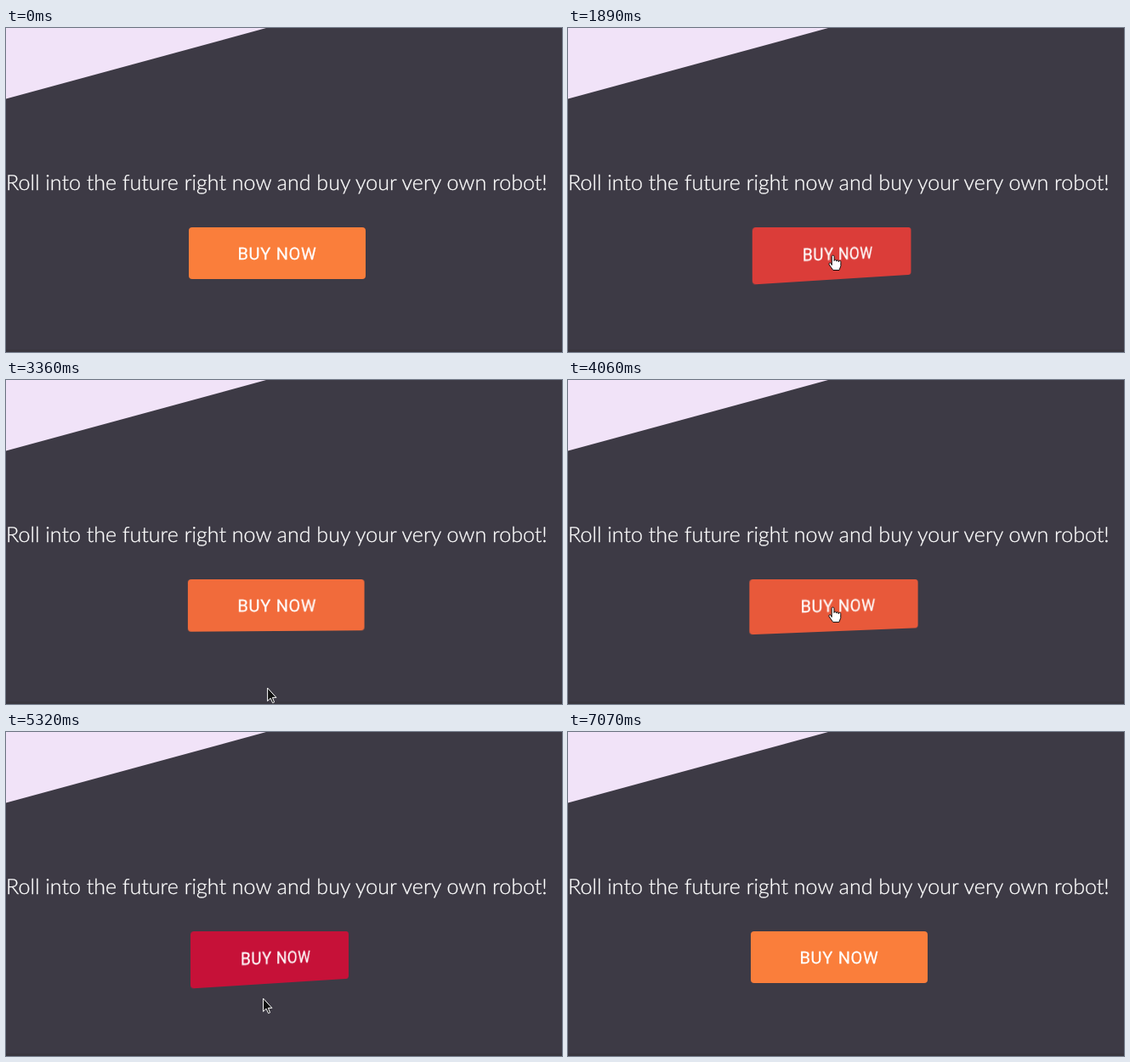
An HTML page that plays this animation: 654x382 px, repeating every 7490 ms.

```html
<!DOCTYPE html>
<html lang="en">
<head>
<meta charset="utf-8">
<title>Buy now</title>
<style>
html, body { margin: 0; width: 100%; height: 100%; overflow: hidden; background: #3d3a45; }
#stage { position: relative; width: 654px; height: 382px; overflow: hidden; }
svg { position: absolute; left: 0; top: 0; }
#line {
  font: 300 26px Lato, sans-serif; text-rendering: geometricPrecision;
  fill: #fff; stroke: #fff; stroke-width: .3px;
}
#button {
  position: absolute; left: 215px; top: 235px; width: 208px; height: 61px;
  border-radius: 4px; transform-origin: 50% 0;
  font: 400 20px/62px Roboto, sans-serif; letter-spacing: .7px;
  text-rendering: geometricPrecision; -webkit-text-stroke: .25px #fff;
  text-align: center; color: #fff;
}
</style>
</head>
<body>
<div id="stage">
  <svg width="654" height="382">
    <path d="M0 0H306L0 83.5Z" fill="#f1e3f8"/>
    <path d="M0 379H654V382H0Z" fill="#39363f"/>
    <text id="line" y="191">Roll into the future right now and buy your very own robot!</text>
  </svg>
  <div id="button">BUY NOW</div>
  <svg width="654" height="382">
    <path id="arrow" d="M.5 .5V16L4 12.6L6.5 18L8.5 17.2L6.3 11.8H10.8Z" fill="#111" stroke="#fff"/>
    <path id="hand" fill="#fff" stroke="#111" stroke-linejoin="round"/>
  </svg>
</div>
<script>
const LOOP = 7490, STEP = 70, TURN = 600;
const $ = id => document.getElementById(id);
const line = $('line'), button = $('button'), arrow = $('arrow'), hand = $('hand');

const hovers = [[1680, 2960], [3910, 5176]];
const rest = [250, 126, 59], hot = [190, 0, 56];

const mix = (a, b, k) => a + (b - a) * k;
const clamp = v => Math.min(1, Math.max(0, v));
const span = (t, from, to) => clamp((t - from) / (to - from));
const glide = (t, from, to) => {
  const k = span(t, from, to);
  return k * k * (3 - 2 * k);
};

const knuckles = 'a1.3 1.3 0 0 1 2.6 0v.6'.repeat(3);
hand.setAttribute('d',
  `M-1.7 11V1a1.4 1.4 0 0 1 2.8 0V6${knuckles}V12L7 17H-.2L-4.8 10.5A1.4 1.4 0 0 1 -2.8 8.6Z`);

// the headline size follows the width it fills
const fitLine = () => {
  const size = parseFloat(getComputedStyle(line).fontSize);
  line.style.fontSize = size * 637 / line.getComputedTextLength() + 'px';
};

// CSS "ease": both axes are cubics of s, solved for s by bisection
function ease(x) {
  const cubic = (a, b, s) => 3 * a * s * (1 - s) ** 2 + 3 * b * s * s * (1 - s) + s ** 3;
  let lo = 0, hi = 1;
  for (let i = 0; i < 20; i++) {
    const s = (lo + hi) / 2;
    if (cubic(.25, .25, s) < x) lo = s; else hi = s;
  }
  return cubic(.1, 1, lo);
}

const turn = (t, start) => ease(span(t, start, start + TURN));
const hover = (t, lagIn, lagOut) => hovers.reduce(
  (sum, [on, off]) => sum + turn(t, on + lagIn) - turn(t, off + lagOut), 0);

// enter, rise onto the button, dip out and back, then slide off
function pointer(t) {
  const enter = glide(t, 300, 1260), rise = glide(t, 1680, 1960);
  const dip = Math.sin(Math.PI * span(t, 2730, 4130)) ** 2;
  const leave = glide(t, 4970, 5340);
  return [
    366 - 54 * enter - 5 * dip - 10 * leave,
    388 - 106 * enter - 16 * rise + 99 * dip + 48 * leave
  ];
}

function draw(t) {
  const angle = 45 * hover(t, 0, 0), tint = hover(t, 30, 70);
  button.style.transform = `perspective(500px) rotateY(${angle}deg)`;
  button.style.background = `rgb(${rest.map((c, i) => Math.round(mix(c, hot[i], tint)))})`;

  const over = hovers.some(([on, off]) => t >= on && t < off);
  const seen = t >= 300 && t < 6160;
  for (const el of [arrow, hand]) {
    el.setAttribute('transform', `translate(${pointer(t)})`);
    el.style.display = seen && over === (el === hand) ? '' : 'none';
  }
}

function tick() {
  draw(Math.floor(performance.now() % LOOP / STEP) * STEP);
  requestAnimationFrame(tick);
}
fitLine();
tick();
</script>
</body>
</html>
```
